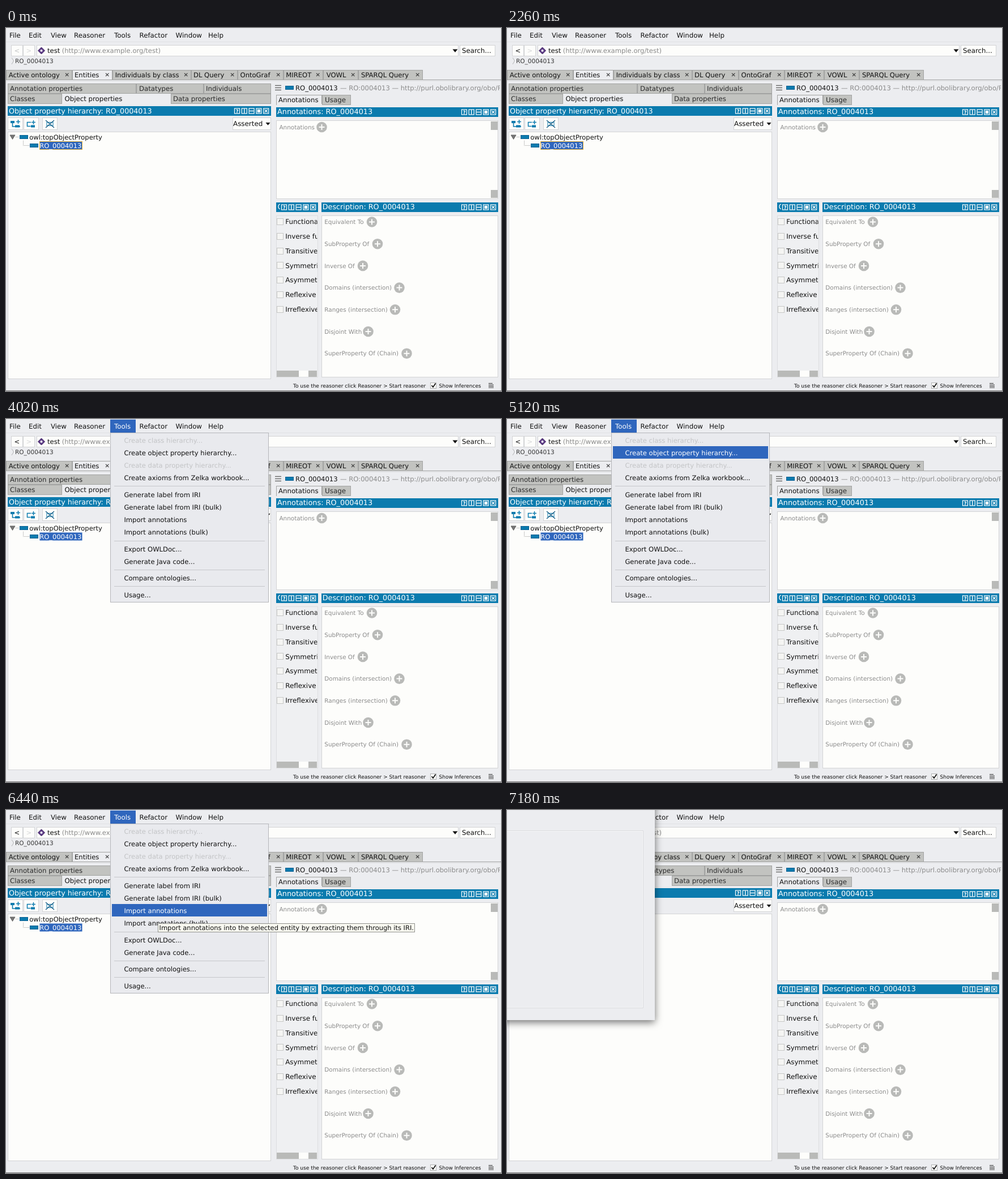
Animation of 874 by 641 pixels, one loop 8 s. Source, as an HTML page:

```html
<!DOCTYPE html>
<html lang="en">
<head>
<meta charset="utf-8">
<title>Ontology editor</title>
<style>
  html, body { margin: 0; width: 100%; height: 100%; overflow: hidden; background: #ecedf0; }
  svg { display: block; width: 874px; height: 641px; }
  text { font: 11.6px "DejaVu Sans", sans-serif; text-rendering: geometricPrecision; white-space: pre; }
  #dialog { filter: drop-shadow(0 4px 7px rgba(0, 0, 0, .55)); }
</style>
</head>
<body>
<svg id="stage" viewBox="0 0 874 641">
  <defs>
    <clipPath id="listClip"><rect x="477" y="325" width="72.5" height="280"/></clipPath>
    <clipPath id="headClip"><rect x="477" y="307" width="7" height="18"/></clipPath>
    <clipPath id="titleClip"><rect x="470" y="94" width="402" height="24"/></clipPath>
  </defs>
</svg>
<script>
const LOOP = 8000;
const C = {
  bg: '#ecedf0', white: '#fdfdfb', tab: '#c2c3c0', line: '#a2a3a2', soft: '#d3d4d6',
  blue: '#0b7bae', pick: '#2f66bd', focus: '#e3b23c', ink: '#111', mute: '#8b8b8b',
  off: '#c3c4c6', knob: '#b9bab8'
};
const stage = document.getElementById('stage');
let layer = stage;

function add(tag, attrs, text) {
  const el = document.createElementNS('http://www.w3.org/2000/svg', tag);
  for (const k in attrs) el.setAttribute(k, attrs[k]);
  if (text !== undefined) el.textContent = text;
  layer.appendChild(el);
  return el;
}
function group(attrs, fill) {
  const parent = layer;
  const g = add('g', attrs);
  layer = g;
  fill();
  layer = parent;
  return g;
}
// Edges given as left, top, right, bottom.
function box(l, t, r, b, fill, stroke) {
  const h = stroke ? .5 : 0;
  return add('rect', { x: l + h, y: t + h, width: r - l - 2 * h, height: b - t - 2 * h, fill, stroke: stroke || 'none' });
}
function path(d, stroke, width = 1, fill = 'none') {
  return add('path', { d, stroke, 'stroke-width': width, fill });
}
// y is the middle of the capitals; the baseline sits on a whole pixel.
function label(x, y, text, fill = C.ink, size = 11.6) {
  const el = add('text', { x, y: Math.round(y + size * .36), fill }, text);
  el.style.fontSize = size + 'px';
  return el;
}
function arrow(x, y, w, fill = C.ink) {
  path(`M${x} ${y}h${w}l${-w / 2} ${w * .6}z`, 'none', 0, fill);
}
function cross(x, y, r, color, width) {
  path(`M${x - r} ${y - r}l${2 * r} ${2 * r}m0 ${-2 * r}l${-2 * r} ${2 * r}`, color, width);
}
function plus(x, y) {
  add('circle', { cx: x, cy: y, r: 9.3, fill: C.knob });
  path(`M${x - 5} ${y}h10M${x} ${y - 5}v10`, C.white, 2);
}
function chip(x, y) { box(x, y, x + 15, y + 7, C.blue, '#0a5f92'); }

function header(l, t, r) {
  box(l, t, r, t + 17, C.blue);
  const y = t + 8.5;
  for (let i = 0; i < 5; i++) {
    const x = r - 60 + i * 12.8;
    add('rect', { x: x - 4.5, y: y - 4.5, width: 9, height: 9, fill: 'none', stroke: '#fff', 'stroke-width': 1.2 });
    if (i === 0) label(x - 2.3, y, '?', '#fff', 8.5).style.fontWeight = 'bold';
    if (i === 1) path(`M${x} ${y - 4}v8`, '#fff', 1.4);
    if (i === 2) path(`M${x - 4} ${y}h8`, '#fff', 1.4);
    if (i === 3) box(x - 2.7, y - 2.7, x + 2.7, y + 2.7, '#fff');
    if (i === 4) cross(x, y, 2.5, '#fff', 1.3);
  }
}

box(0, 0, 874, 641, C.bg);

// Menu bar
const toolsMark = box(184, 1, 229, 24, C.pick);
const menus = [['File', 6], ['Edit', 40], ['View', 79], ['Reasoner', 120], ['Tools', 191],
  ['Refactor', 235.5], ['Window', 299.5], ['Help', 357]]
  .map(([name, x]) => label(x, 12.5, name, C.ink, 11.8));
const toolsText = menus[4];

// Address row
path('M0 24.5H874', '#e0e1e4');
box(9, 30, 30, 50, C.white, C.soft);
box(30, 30, 51, 50, C.white, C.soft);
const back = label(14.5, 40, '<', C.off);
label(35.5, 40, '>', '#d6d7d8');
box(54, 30, 799, 50, C.white, C.soft);
path('M62.5 34l6 6l-6 6l-6-6z', '#3d2460', 1, '#5d3a86');
add('circle', { cx: 62.5, cy: 40, r: 2, fill: '#fff' });
label(73, 40, 'test');
label(98.7, 40, '(http://www.example.org/test)', C.mute);
arrow(788.5, 37.5, 9);
box(801, 30, 864, 50, C.white, C.soft);
label(805, 40, 'Search...', C.ink, 11.8);
const crumb = group({}, () => {
  path('M10 52.5l3.5 5.5l-3.5 6', '#b5b6b8');
  label(16, 58, 'RO_0004013', '#333', 10.5);
});

// Main tabs
[['Active ontology', 0, 117, 4.7], ['Entities', 117, 188, 121], ['Individuals by class', 188, 327, 192.7],
  ['DL Query', 327, 409, 331], ['OntoGraf', 409, 490, 413.5], ['MIREOT', 490, 560, 494.3],
  ['VOWL', 560, 622, 565.7], ['SPARQL Query', 622, 736, 627]].forEach(([name, l, r, x], i) => {
  box(l, 74, r, 92, i === 1 ? C.bg : C.tab, C.line);
  label(x, 82.7, name);
  cross(r - 9.3, 82.5, 2.7, '#333', 1.1);
});
path('M0 91.5H117M188 91.5H874', C.line);
path('M0 93.5H874', '#dddee1');

// Entity tabs
[['Annotation properties', 3, 230, 98, 7], ['Datatypes', 230, 349, 98, 235], ['Individuals', 349, 468, 98, 353],
  ['Classes', 3, 99, 116, 7], ['Object properties', 99, 291, 116, 103.5], ['Data properties', 291, 468, 116, 295]]
  .forEach(([name, l, r, t, x]) => {
    const on = name.startsWith('Object');
    box(l, t, r, t + (on ? 20 : 18), on ? C.bg : C.tab, on ? 'none' : C.line);
    label(x, t + 9.2, name, on ? C.ink : '#2a2a2a', 11.75);
  });

// Hierarchy pane
header(3, 138, 468);
const treeHead = label(5, 146, '', '#fff', 12.7);
[3, 31, 64].forEach(x => box(x, 158, x + 27, 180, C.white, C.soft));
box(8, 164, 15, 168, C.blue);
path('M11.5 168v6h6M18 174h7', C.blue, 1.6);
box(16, 171.5, 24, 175.5, C.blue);
path('M18 165.5h7M21.5 162v7', C.blue, 1.6);
const sibling = group({}, () => {
  path('M44 166.5h-6.5v7h6', 'currentColor', 1.5);
  box(44, 171.5, 51, 175.5, 'currentColor');
  path('M45 166.5h7M48.5 163v7', 'currentColor', 1.5);
});
box(71.5, 166, 83.5, 173, 'none', C.blue);
path('M70 163l15 13M85 163l-15 13', '#1b5f86', 1.4);
box(400, 158, 468, 180, C.white, C.soft);
label(401, 169, 'Asserted', C.ink, 11.9);
arrow(458.5, 167, 8);

box(3, 183, 468, 620, C.white, C.soft);
path('M7 189h9l-4.5 7.5z', '#555', .8, '#777');
path('M17 192.5H23M30.5 199V207.5H42', '#999', 1).setAttribute('stroke-dasharray', '1 1');
chip(24, 189);
chip(42, 204);
const rows = [['owl:topObjectProperty', 41, 171, 185], ['RO_0004013', 59, 135, 200]].map(([name, l, r, t]) => ({
  mark: box(l, t, r, t + 15, C.pick, C.focus),
  text: label(l + .3, t + 7.7, name, C.ink, 11.5)
}));

// Entity title
[102, 106, 110].forEach(y => path(`M475 ${y - .5}h11`, '#666', 1.4));
chip(493, 102);
let titleName, titleRest;
group({ 'clip-path': 'url(#titleClip)' }, () => {
  titleName = label(511, 106, '');
  titleRest = label(590, 106, '', C.mute);
});
box(477, 118, 558, 136, C.bg, C.line);
box(558, 118, 609, 136, C.tab, C.line);
box(478, 134, 558, 137, C.bg);
label(481, 126.7, 'Annotations', C.ink, 11.75);
label(563, 126.7, 'Usage', '#2a2a2a', 11.9);

// Annotations pane
header(477, 140, 869);
const noteHead = label(479, 147.7, '', '#fff', 12.85);
box(477, 163, 869, 302, C.white, C.soft);
box(856, 165, 868, 180, C.knob);
box(856, 286, 868, 300, C.knob);
label(482.5, 175, 'Annotations', C.mute, 10.4);
plus(557.5, 175);

// Characteristics pane
header(477, 308, 551);
group({ 'clip-path': 'url(#headClip)' }, () => label(479.5, 315.3, 'Characteristics', '#fff', 12.75));
box(477, 331, 551, 617, '#eff0f2', '#dddee0');
group({ 'clip-path': 'url(#listClip)' }, () => {
  ['Functional', 'Inverse functional', 'Transitive', 'Symmetric', 'Asymmetric', 'Reflexive', 'Irreflexive']
    .forEach((name, i) => {
      const y = 342 + i * 25.8;
      box(478, Math.round(y) - 6, 490, Math.round(y) + 6, '#f5f5f3', '#c6c7c6');
      label(493.2, y, name, C.ink, 11.9);
    });
});
box(478, 605, 549, 616, C.knob);
box(517, 605, 534, 616, C.white);

// Description pane
header(557, 308, 869);
const descHead = label(558.8, 315.3, '', '#fff', 12.75);
box(557, 331, 869, 617, C.white, C.soft);
[['Equivalent To', 646], ['SubProperty Of', 656], ['Inverse Of', 630], ['Domains (intersection)', 694.5],
  ['Ranges (intersection)', 687], ['Disjoint With', 639.5], ['SuperProperty Of (Chain)', 707.5]]
  .forEach(([name, x], i) => {
    const y = 342.5 + i * 38.7;
    label(562.3, y, name, C.mute, 10.4);
    plus(x, y);
  });

// Status bar
label(507, 631.5, 'To use the reasoner click Reasoner > Start reasoner', C.ink, 9);
box(749, 626, 760, 637, C.white, '#b0b1b2');
path('M751.5 631l2.5 3l4.5-6.5', C.ink, 1.7);
label(764.5, 631.5, 'Show Inferences', C.ink, 9);
path('M852 627.5h7M852 630h9M852 632.5h9M852 635h9', '#333', 1.1);
path('M0 640.5H874', '#777');

// Tools menu
const items = [];
const menu = group({}, () => {
  box(184, 24, 464, 324, '#e9eaee', '#b5b6ba');
  [118.5, 215.5, 266.5, 295.5].forEach(y => path(`M191 ${y}H457`, '#c6c7cb'));
  [['Create class hierarchy...', 38, 1], ['Create object property hierarchy...', 60],
    ['Create data property hierarchy...', 82, 1], ['Create axioms from Zelka workbook...', 104],
    ['Generate label from IRI', 134], ['Generate label from IRI (bulk)', 156],
    ['Import annotations', 178], ['Import annotations (bulk)', 200], ['Export OWLDoc...', 230],
    ['Generate Java code...', 252], ['Compare ontologies...', 281], ['Usage...', 311]]
    .forEach(([name, y, dim]) => items.push({
      dim,
      mark: box(187, y - 12, 461, y + 10, C.pick),
      text: label(208.4, y, name)
    }));
});
const tip = group({}, () => {
  box(268, 200, 722, 216, '#f8f8f0', '#8f908c');
  label(270.5, 207.8, 'Import annotations into the selected entity by extracting them through its IRI.', C.ink, 11.5);
});

// Dialog reaching in from the upper left
const dialog = group({ id: 'dialog' }, () => {
  box(-300, -300, 261, 371, C.bg);
  path('M-10 36.5H240.5V349.5H-10', '#dadbde');
  path('M-10 37.5H239.5V348.5H-10', '#f6f6f7');
});

// time, selected row, back enabled, menu open, hovered item, tooltip
const steps = [
  [0, 1, 0, 0, -1, 0],
  [1390, 0, 1, 0, -1, 0],
  [2260, 1, 1, 0, -1, 0],
  [4020, 1, 1, 1, -1, 0],
  [5120, 1, 1, 1, 1, 0],
  [5150, 1, 1, 1, -1, 0],
  [5190, 1, 1, 1, 3, 0],
  [5260, 1, 1, 1, 4, 0],
  [5320, 1, 1, 1, 5, 0],
  [5470, 1, 1, 1, 6, 0],
  [6440, 1, 1, 1, 6, 1],
  [6860, 1, 1, 0, -1, 0]
];
const show = (el, on) => { el.style.display = on ? '' : 'none'; };
let current;

function apply(step) {
  const [, row, canBack, open, hover, hint] = step;
  const name = rows[row].text.textContent;
  rows.forEach((r, i) => {
    show(r.mark, i === row);
    r.mark.setAttribute('stroke', open ? 'none' : C.focus);
    r.text.setAttribute('fill', i === row ? '#fff' : C.ink);
  });
  treeHead.textContent = 'Object property hierarchy: ' + name;
  noteHead.textContent = 'Annotations: ' + name;
  descHead.textContent = 'Description: ' + name;
  titleName.textContent = name;
  titleRest.textContent = row ? '— RO:0004013 — http://purl.obolibrary.org/obo/RO_0004013'
    : '— http://www.w3.org/2002/07/owl#topObjectProperty';
  titleRest.setAttribute('x', row ? 590 : 644);
  show(crumb, row);
  sibling.style.color = row ? C.blue : C.knob;
  back.setAttribute('fill', canBack ? C.ink : C.off);
  show(toolsMark, open);
  toolsText.setAttribute('fill', open ? '#fff' : C.ink);
  show(menu, open);
  items.forEach((it, i) => {
    show(it.mark, i === hover);
    it.text.setAttribute('fill', i === hover ? '#fff' : it.dim ? C.off : C.ink);
  });
  show(tip, hint);
}

const start = performance.now();
function frame() {
  const t = Math.max(0, performance.now() - start) % LOOP;
  const step = steps.filter(s => s[0] <= t).pop();
  if (step !== current) apply(current = step);
  const fade = Math.min(1, Math.max(0, (t - 6880) / 140));
  show(dialog, fade > 0);
  dialog.style.opacity = fade;
  requestAnimationFrame(frame);
}
frame();
</script>
</body>
</html>
```
